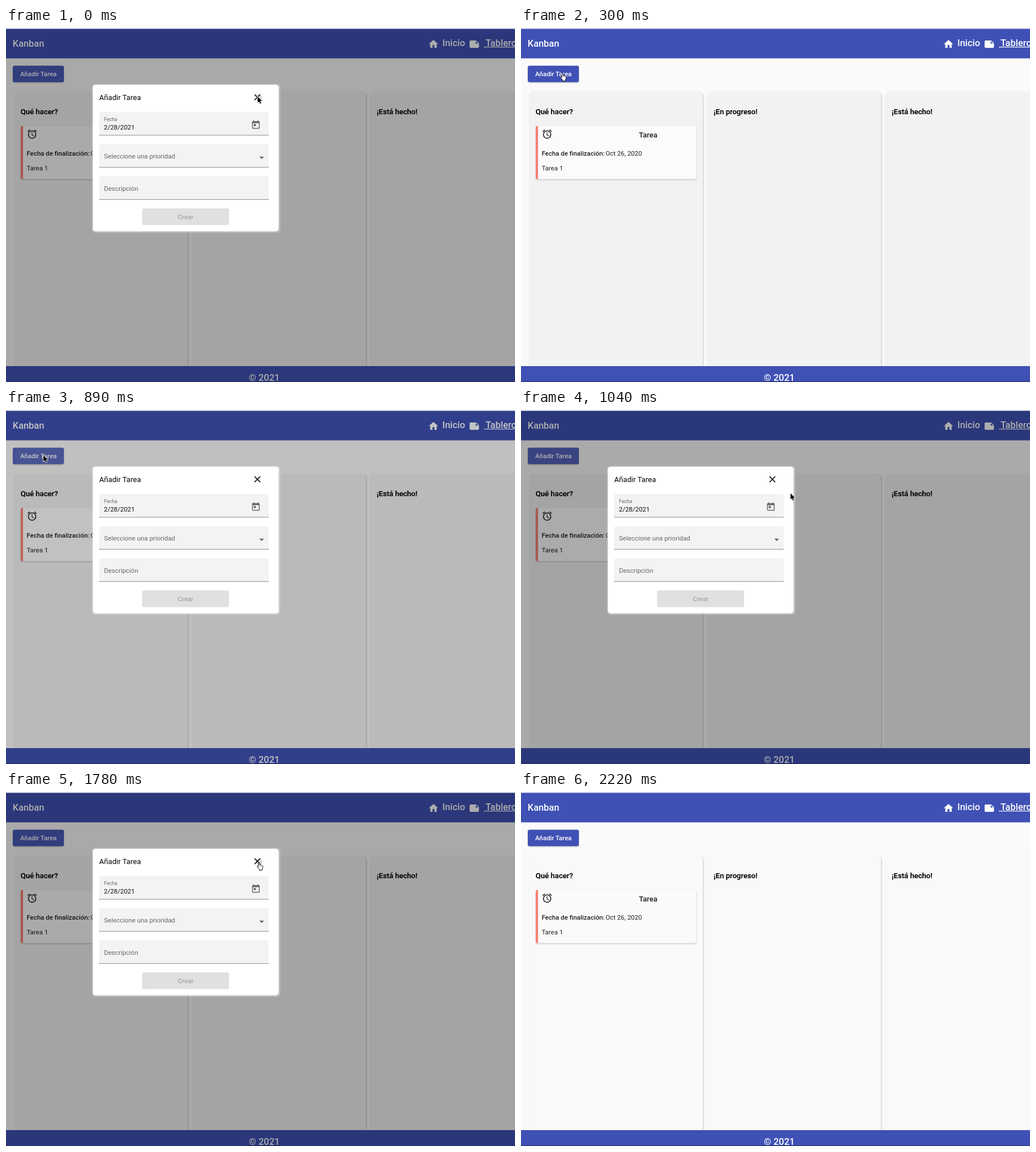
These frames come from a looping animation (897x624 px, 2.82 s). An HTML page:

```html
<!DOCTYPE html>
<html lang="es">
<head>
<meta charset="utf-8">
<title>Kanban</title>
<style>
html, body { margin: 0; width: 100%; height: 100%; overflow: hidden; background: #fafafa; }
svg { display: block; }
text { font-family: Roboto, "Open Sans", sans-serif; font-size: 11.45px; fill: #1f1f1f; }
.bar { fill: #3f51b5; }
.nav { font-size: 16.4px; font-weight: 500; fill: #fff; }
.head { font-size: 13.1px; font-weight: 500; fill: #000; stroke: #000; stroke-width: .2px; }
.title { font-size: 13.1px; fill: #000; }
.med { font-weight: 500; }
.label { fill: #666; }
.icon { fill: #222; }
.soft { fill: #666; }
.col { filter: drop-shadow(1px 1px 1.2px rgba(0,0,0,.22)); }
.card, .btn { filter: drop-shadow(0 1.5px 1px rgba(0,0,0,.24)); }

/* Every change is a hard step on one shared clock. */
.col, .card, .focus, .ripple, .shade, .modal, .hover, .cursor, .arrow, .hand {
  animation: 2820ms step-end infinite;
}
.col { animation-name: col; }
.card { animation-name: card; }
.focus { animation-name: focus; }
.ripple { animation-name: ripple; }
.shade { animation-name: shade; }
.modal { animation-name: modal; }
.hover { animation-name: hover; }
.cursor { animation-name: move; }
.arrow { animation-name: arrow; }
.hand { animation-name: hand; }

@keyframes col { 0% { fill: #f2f2f2 } 73.404%, 100% { fill: #f9f9f9 } }
@keyframes card { 0% { fill: #fbfbfb } 73.404%, 100% { fill: #fafafa } }
@keyframes focus {
  0% { opacity: .06 } 5.319% { opacity: 0 } 26.241% { opacity: .1 }
  42.198% { opacity: .06 } 73.404%, 100% { opacity: 0 }
}
@keyframes ripple {
  0% { opacity: 0; r: 0 } 26.241% { opacity: .1; r: 26px }
  31.56% { opacity: .06; r: 46px } 36.879%, 100% { opacity: 0; r: 0 }
}
@keyframes shade {
  0% { opacity: .325 } 5.319% { opacity: .2 } 10.638% { opacity: 0 }
  31.56% { opacity: .23 } 36.879% { opacity: .32 } 42.198% { opacity: .325 }
  68.085% { opacity: .22 } 73.404%, 100% { opacity: 0 }
}
@keyframes modal {
  0% { visibility: visible } 5.319% { visibility: hidden }
  31.56% { visibility: visible } 68.085%, 100% { visibility: hidden }
}
@keyframes hover { 0% { opacity: 1 } 5.319% { opacity: 0 } 63.12%, 100% { opacity: 1 } }
@keyframes move {
  0% { transform: translate(443.5px, 121px) }
  5.319% { transform: translate(250px, 104px) }
  10.638% { transform: translate(69px, 79.5px) }
  15.602% { transform: translate(62px, 79.5px) }
  31.56% { transform: translate(66px, 80px) }
  36.879% { transform: translate(475px, 147px) }
  42.198% { transform: translate(470px, 142px) }
  47.517% { transform: translate(450px, 132px) }
  52.482% { transform: translate(445px, 126px) }
  57.801% { transform: translate(442px, 124px) }
  68.085% { transform: translate(657.5px, 449px) }
  73.404%, 100% { transform: translate(761px, 598px) }
}
@keyframes arrow {
  0% { opacity: 1 } 10.638% { opacity: 0 } 31.56% { opacity: 1 }
  57.801% { opacity: 0 } 68.085% { opacity: 1 } 78.723%, 100% { opacity: 0 }
}
@keyframes hand {
  0% { opacity: 0 } 10.638% { opacity: 1 } 31.56% { opacity: 0 }
  57.801% { opacity: 1 } 68.085%, 100% { opacity: 0 }
}
</style>
</head>
<body>
<svg width="897" height="624" viewBox="0 0 897 624">
  <defs>
    <clipPath id="btnClip"><rect x="12" y="66.5" width="90" height="29" rx="3"/></clipPath>
  </defs>
  <rect width="897" height="624" fill="#fafafa"/>

  <!-- board -->
  <rect class="col" x="14" y="112" width="306.500" height="540" rx="8"/>
  <rect class="col" x="328" y="112" width="306.500" height="540" rx="8"/>
  <rect class="col" x="641.500" y="112" width="306.500" height="540" rx="8"/>
  <text class="head" x="25.700" y="152">Qué hacer?</text>
  <text class="head" x="339.500" y="152">¡En progreso!</text>
  <text class="head" x="653.300" y="152">¡Está hecho!</text>

  <rect class="card" x="26" y="172.500" width="283" height="94" rx="3.500"/>
  <path fill="#fa8072" d="M30 172.500h-.5a3.500 3.500 0 0 0-3.500 3.500v87a3.500 3.500 0 0 0 3.500 3.500h.5z"/>
  <path class="icon" transform="translate(36.200 177.200) scale(.82)" d="M22 5.720l-4.600-3.860-1.290 1.530 4.600 3.860zM7.880 3.390L6.600 1.860 2 5.710l1.290 1.530zM12.500 8H11v6l4.750 2.850.75-1.230-4-2.370zM12 4a9 9 0 1 0 0 18 9 9 0 0 0 0-18zm0 16a7 7 0 1 1 0-14 7 7 0 0 1 0 14z"/>
  <text class="med" x="207.800" y="193" style="font-size:13.100px">Tarea</text>
  <text class="med" x="36.400" y="225">Fecha de finalización:</text>
  <text x="149" y="225">Oct 26, 2020</text>
  <text x="36.400" y="251">Tarea 1</text>

  <rect class="bar btn" x="12" y="66.500" width="90" height="29" rx="3"/>
  <g clip-path="url(#btnClip)" fill="#fff">
    <rect class="focus" x="12" y="66" width="90" height="30"/>
    <circle class="ripple" cx="62" cy="81"/>
  </g>
  <text class="med" x="25" y="85" style="fill:#fff">Añadir Tarea</text>

  <!-- header and footer -->
  <rect class="bar" y="1" width="897" height="52.500"/>
  <text class="nav" x="11.800" y="33">Kanban</text>
  <path fill="#fff" transform="translate(743.500 18.500) scale(.82)" d="M10 20v-6h4v6h5v-8h3L12 3 2 12h3v8z"/>
  <text class="nav" x="769" y="32">Inicio</text>
  <path fill="#fff" transform="translate(815.400 18.600) scale(.82)" d="M22 10l-6-6H4a2 2 0 0 0-2 2v12a2 2 0 0 0 2 2h16a2 2 0 0 0 2-2zm-7-4.500l5.500 5.500H15z"/>
  <text class="nav" x="845" y="32">Tablero</text>
  <rect fill="#fff" x="842" y="33" width="55" height="1.200"/>
  <rect class="bar" y="596" width="897" height="28"/>
  <text class="nav" x="455.200" y="622.300" text-anchor="middle">© 2021</text>

  <rect class="shade" width="897" height="624"/>
  <rect width="897" height="1.500" fill="#eceef1"/>
  <rect y="623" width="897" height="1" fill="#232b5c"/>

  <!-- dialog -->
  <g class="modal">
    <rect x="151.500" y="98.500" width="332" height="262.500" rx="6" fill="#fff" opacity=".25"/>
    <rect x="153" y="100" width="327.500" height="258.500" rx="5" fill="#fff"/>
    <text class="title" x="164.300" y="127">Añadir Tarea</text>
    <circle class="hover" cx="446" cy="123" r="6" fill="#dcdcdc"/>
    <path d="M438 117.200l10 10m0-10l-10 10" stroke="#1c1c1c" stroke-width="1.700"/>
    <g fill="#f3f3f3">
      <path id="field" d="M164 189v-38q0-3 3-3h293q3 0 3 3v38z"/>
      <use href="#field" y="57"/>
      <use href="#field" y="113.500"/>
    </g>
    <path d="M164 189h299M164 245.500h299M164 302.300h299" stroke="#8c8c8c"/>
    <text class="label" x="172.800" y="163.700" style="font-size:8.600px">Fecha</text>
    <text x="172.500" y="179" style="fill:#111">2/28/2021</text>
    <text class="label" x="172.800" y="230">Seleccione una prioridad</text>
    <text class="label" x="172.800" y="286.700">Descripción</text>
    <path class="soft" transform="translate(431.400 161.900) scale(.745)" d="M19 3h-1V1h-2v2H8V1H6v2H5a2 2 0 0 0-2 2v14a2 2 0 0 0 2 2h14a2 2 0 0 0 2-2V5a2 2 0 0 0-2-2zm0 16H5V8h14zM7 10h5v5H7z"/>
    <path class="soft" d="M446.400 226.800h8.400l-4.200 4.200z"/>
    <rect x="240" y="318" width="153" height="29.500" rx="3" fill="#e0e0e0"/>
    <text class="med" x="316.500" y="337" text-anchor="middle" style="fill:#a6a6a6">Crear</text>
  </g>

  <g class="cursor" stroke-linejoin="round">
    <path class="arrow" stroke="#fff" stroke-width="1.600" paint-order="stroke" d="M0 0v10.800l2.500-2.300 1.700 4 1.800-.8-1.700-3.900h3.500z"/>
    <path class="hand" fill="#fff" stroke="#000" d="M3 1.300c0-1.400 2-1.400 2.100 0L5.500 5c.6-.6 1.600-.5 1.800.3.600-.5 1.500-.3 1.700.5.700-.4 1.600 0 1.600.9 0 2.600-.4 4-1.400 5.300v2H4.600v-1.600C3.300 11 2 9.500.7 7.700-.1 6.600 1.400 5.800 2.300 6.700l.9.900z"/>
  </g>
</svg>
</body>
</html>
```
